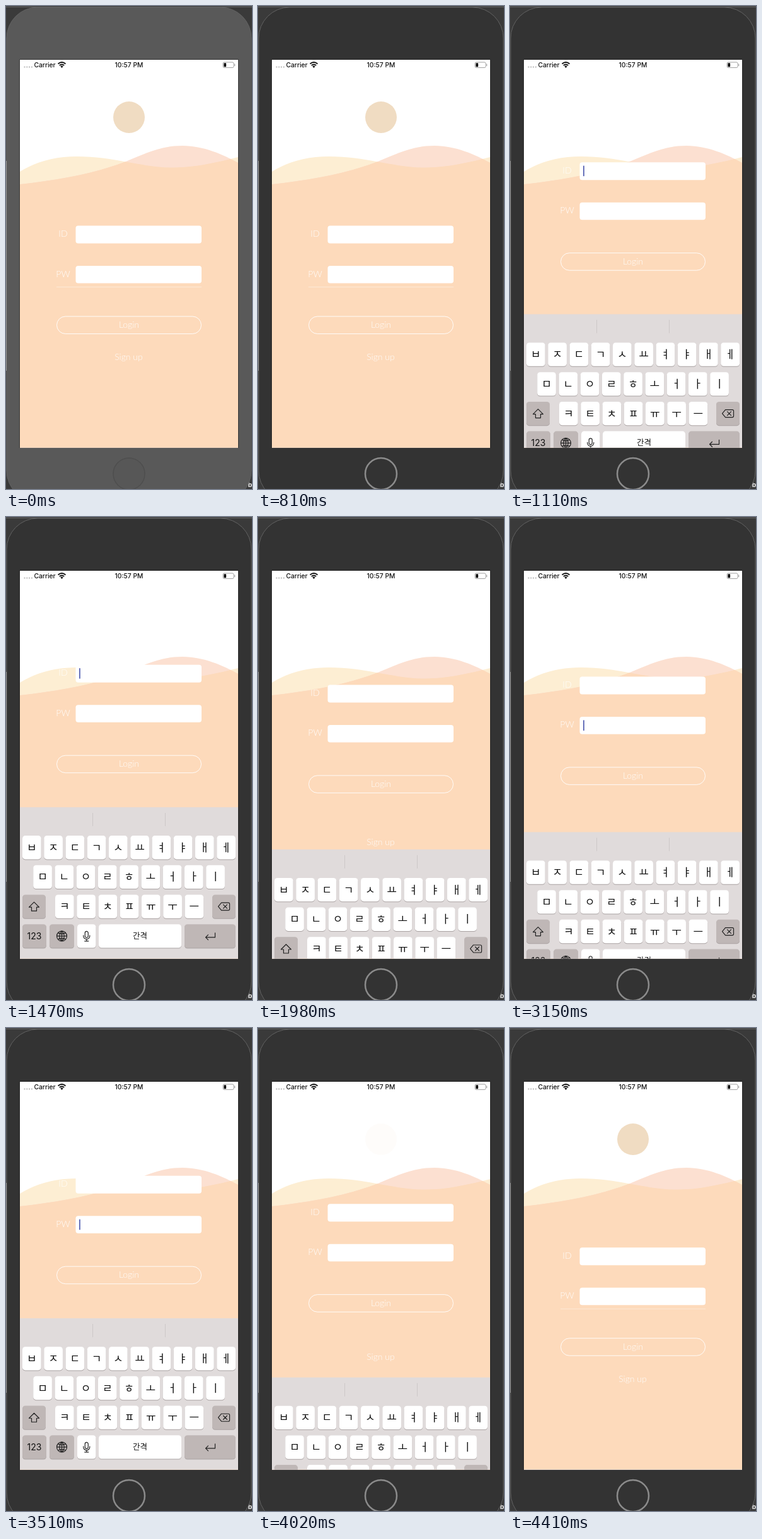
Write an HTML page that moves like this. It is 390x764 px and loops after 5.07 s.

```html
<!DOCTYPE html>
<html lang="ko">
<head>
<meta charset="utf-8">
<style>
  html, body { margin: 0; width: 100%; height: 100%; overflow: hidden; background: #3a3a3a; }
  svg { display: block; width: 390px; height: 764px; }
  text { text-anchor: middle; }
  .form text { font: 300 14px Lato, sans-serif; fill: #fff; fill-opacity: .95; }
  .status { font: 500 10.3px Inter, sans-serif; fill: #111; }
  .key text { font: 17px "Noto Sans CJK KR", "Noto Sans CJK", sans-serif; fill: #111; }
  .key .small { font-size: 12.5px; }
  .key .latin { font: 14px Inter, sans-serif; }
  .icon { fill: none; stroke: #222; stroke-width: 1.2; stroke-linejoin: round; stroke-linecap: round; }
</style>
</head>
<body>
<svg viewBox="0 0 390 764">
  <defs>
    <clipPath id="screen"><rect x="22" y="85" width="346" height="613.5"/></clipPath>
    <path id="front" d="M22 282C85 275 140 265 190 246C222 233 245 221 280 221C313 221 344 235 368 248V699H22Z"/>
    <path id="back" d="M22 262C50 245 80 238 112 238C142 238 165 242 190 246.500C218 251 238 256 267 255.500C304 255 335 247 368 239V699H22Z"/>
    <clipPath id="overlap"><use href="#back"/></clipPath>
  </defs>

  <path d="M0 1.500H390" stroke="#666"/>
  <rect y="245" width="1" height="332" fill="#ccc"/>
  <text x="387" y="761" font-family="Inter, sans-serif" font-weight="700" font-size="10" fill="#eee">b</text>
  <rect id="body" x="1" y="2" width="388" height="782" rx="49" stroke="#626262"/>
  <circle id="home" cx="195" cy="740" r="25"/>
  <rect x="21.500" y="84.500" width="347" height="614.500" fill="#111"/>

  <g clip-path="url(#screen)">
    <rect x="22" y="85" width="346" height="614" fill="#fff"/>
    <use href="#back" fill="#fdeed3"/>
    <use href="#front" fill="#fce0d1"/>
    <use href="#front" fill="#fddabb" clip-path="url(#overlap)"/>

    <g class="status">
      <text x="61.500" y="97">Carrier</text>
      <text x="195" y="97">10:57 PM</text>
      <path d="M28.500 96.500H42" stroke="#bbb" stroke-width="2" stroke-dasharray="2 1.800"/>
      <path d="M82.500 91.500Q88.500 86.500 94.500 91.500M84.800 94Q88.500 91 92.200 94" fill="none" stroke="#111" stroke-width="1.800"/>
      <path d="M86.300 95.500Q88.500 93.700 90.700 95.500L88.500 98Z"/>
      <rect x="344" y="89" width="17" height="8.500" rx="2" fill="none" stroke="#999" stroke-width=".9"/>
      <rect x="345.300" y="90.300" width="3.800" height="6" rx=".8"/>
      <path d="M362.700 91.500V95" stroke="#999"/>
    </g>

    <circle id="badge" cx="195" cy="176" r="25" fill="#f0dcc2"/>

    <g class="form">
      <g id="form">
        <text x="90.500" y="365">ID</text>
        <text x="90.500" y="428.500">PW</text>
        <g fill="#fff">
          <rect x="110.500" y="347.500" width="199.500" height="28" rx="4"/>
          <rect x="110.500" y="411" width="199.500" height="27.500" rx="4"/>
        </g>
        <path id="line" d="M80 444.500H310" stroke="#fff" stroke-opacity=".4"/>
        <rect x="80.500" y="491" width="229" height="27.500" rx="13.750" fill="none" stroke="#fff" stroke-opacity=".9"/>
        <text x="195" y="509">Login</text>
        <rect id="caret" x="116" width="1.800" height="16.500" fill="#5964b4"/>
      </g>
      <text id="signup" x="194.500" y="560">Sign up</text>
    </g>

    <g id="keyboard">
      <rect x="22" width="346" height="245" fill="#e0dbdb"/>
      <path d="M137.500 9V30M252.500 9V30" stroke="#cdc7c7"/>
    </g>
  </g>
</svg>
<script>
const LOOP = 5070, KEYBOARD = 239.5, BOTTOM = 698.5;
const $ = id => document.getElementById(id);
const keyboard = $('keyboard');

function key(x, row, width, content, dark) {
  const y = 45 + row * 46.7, fill = dark ? '#bfb7b6' : '#fff';
  keyboard.insertAdjacentHTML('beforeend', `<g class="key" transform="translate(${x} ${y})">
    <rect y="1" width="${width}" height="37.3" rx="4.5" fill="#aaa3a3"/>
    <rect width="${width}" height="37.3" rx="4.5" fill="${fill}"/>
    <g transform="translate(${width / 2} 18.7)">${content}</g></g>`);
}
const label = (text, type = '', y = 6) => `<text class="${type}" y="${y}">${text}</text>`;
const icon = d => `<path class="icon" d="${d}"/>`;

[['ㅂㅈㄷㄱㅅㅛㅕㅑㅐㅔ', 26], ['ㅁㄴㅇㄹㅎㅗㅓㅏㅣ', 43.2], ['ㅋㅌㅊㅍㅠㅜㅡ', 78]].forEach(([letters, left], row) =>
  [...letters].forEach((letter, i) => key(left + i * 34.25, row, 29.7, label(letter))));

key(26, 2, 37, icon('M0-7L8 1H4V7H-4V1H-8Z'), true);
key(327, 2, 37, icon('M-9 0L-4-6H7Q9-6 9-4V4Q9 6 7 6H-4ZM-1-3L5 3M5-3L-1 3'), true);
key(26, 3, 38, label('123', 'latin', 5), true);
key(69, 3, 39, icon('M-8 0A8 8 0 1 1 8 0A8 8 0 1 1-8 0H8M0-8V8M0-8C-5-4-5 4 0 8C5 4 5-4 0-8M-6-5Q0-2 6-5M-6 5Q0 2 6 5'), true);
key(113, 3, 29.5, icon('M-2.5-5A2.5 2.500 0 0 1 2.500-5V0A2.500 2.500 0 0 1-2.500 0ZM-5-1V0A5 5 0 0 0 5 0V-1M0 5V8M-3 8H3'));
key(147, 3, 131, label('간격', 'small', 4));
key(283, 3, 81, icon('M8-5V2H-7M-3-2L-7 2L-3 6'), true);

// Critically damped spring, as used by the system keyboard.
function settle(ms) {
  const x = Math.max(0, ms) * 0.01826;
  return 1 - (1 + x) * Math.exp(-x);
}
const clamp = v => Math.min(1, Math.max(0, v));
const shift = (el, y) => el.setAttribute('transform', `translate(0 ${y})`);

function draw(now) {
  const t = now % LOOP;
  const open = settle(t - 910) - settle(t - 1924) + settle(t - 2973) - settle(t - 3947);
  const rise = open * KEYBOARD, lift = rise * 0.4755;
  const second = t >= 2500;
  const fade = clamp(1 - 1.5 * open);
  const inactive = t < 810;

  $('body').setAttribute('fill', inactive ? '#595959' : '#333');
  $('home').setAttribute('fill', inactive ? '#575757' : '#333');
  $('home').setAttribute('stroke', inactive ? '#4e4e4e' : '#8b8b8b');
  $('home').setAttribute('stroke-width', inactive ? 1.5 : 2.5);

  shift(keyboard, BOTTOM - rise);
  shift($('form'), -lift);
  shift($('signup'), -lift / 2);
  $('badge').setAttribute('opacity', fade);
  $('line').setAttribute('opacity', fade);

  const [on, off] = second ? [2973, 3840] : [910, 1770];
  $('caret').setAttribute('y', second ? 416.5 : 353);
  $('caret').setAttribute('opacity', t < on ? 0 : clamp(1 - (t - off) / 120));
  requestAnimationFrame(draw);
}
draw(performance.now());
</script>
</body>
</html>
```
